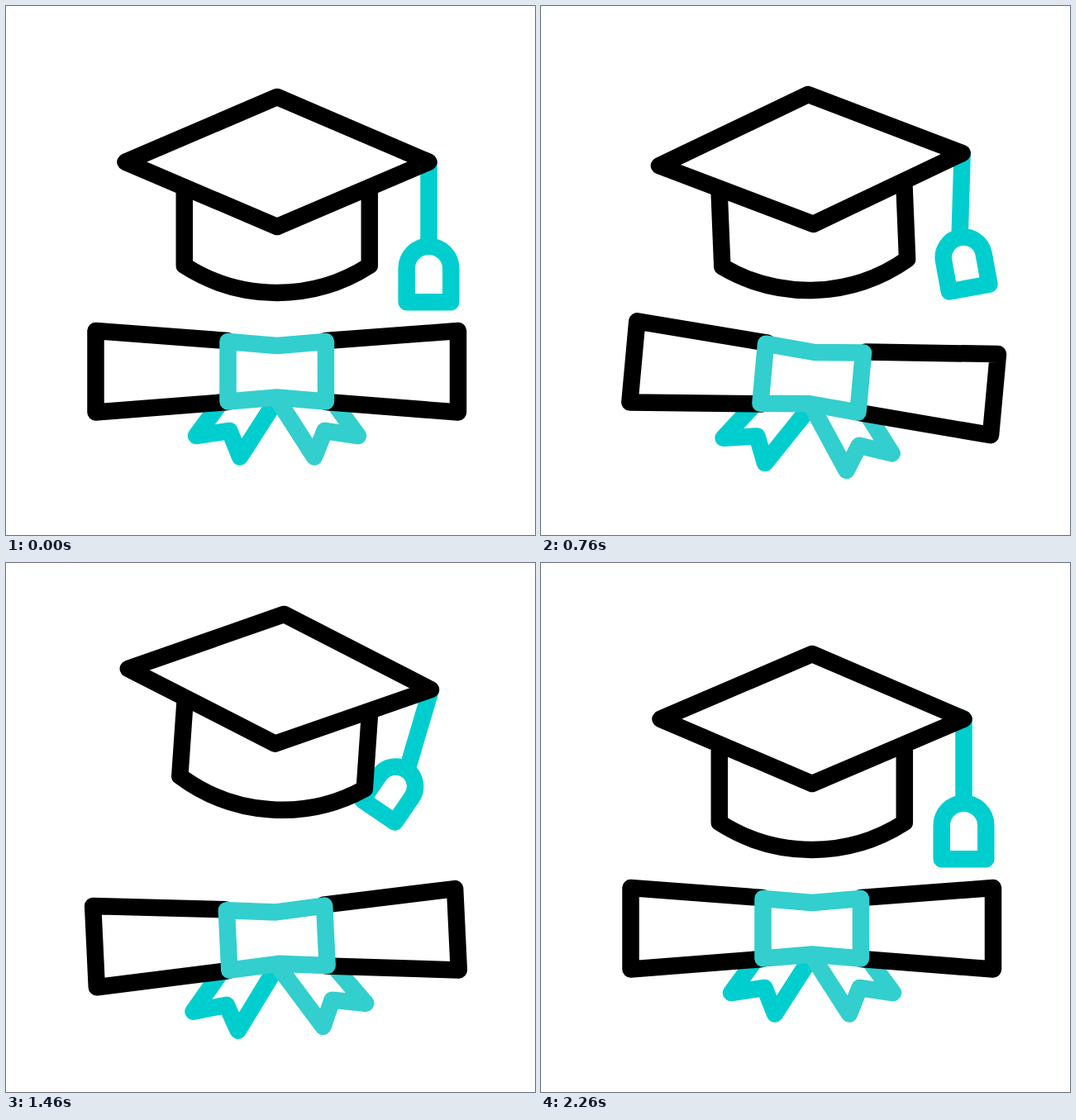
These frames come from a looping animation (640x640 px, 2.4 s). An HTML page:

```html
<!DOCTYPE html>
<html lang="en">
<head>
<meta charset="utf-8">
<title>Graduation cap and diploma</title>
<style>
html, body { margin: 0; height: 100%; overflow: hidden; background: #fff; }
svg { display: block; width: 100%; height: 100%; }
path { fill: #fff; stroke: #000; stroke-width: 20.5; stroke-linecap: round; stroke-linejoin: round; }
#bob { vector-effect: non-scaling-stroke; }
.teal { stroke: #00cece; }
.light { stroke: #33cece; }
</style>
</head>
<body>
<svg viewBox="0 0 640 640">
  <path id="tailL" class="teal"/>
  <path id="tailR" class="light"/>
  <path id="paper" d="M268 405L108.5 393V491.5L268 479M387 405L547 393V491.5L387 479"/>
  <path id="knot" class="light" d="M268.5 406L328 411L387 406V478.5L328 473.5L268.5 478.5Z"/>
  <g id="cap">
    <g id="tassel">
      <path class="teal" d="M511.5 189V287"/>
      <g transform="translate(511.5 289)">
        <path id="bob" class="teal" d="M-26.8 69.3V28.5A26.8 26.8 0 0 1 26.8 28.5V69.3Z"/>
      </g>
    </g>
    <path d="M215.8 200V314A207 207 0 0 0 439.8 314V200"/>
    <path d="M328 110L511.5 188.7L328 267L144.5 188.7Z"/>
  </g>
</svg>
<script>
const LOOP = 2400;
const el = id => document.getElementById(id);

// Smooth step from 0 to 1 between two times.
function ramp(t, start, end) {
  const p = Math.min(1, Math.max(0, (t - start) / (end - start)));
  return p * p * (3 - 2 * p);
}

// Rises to 1 at the peak and falls back to 0.
const pulse = (t, start, peak, end) => ramp(t, start, peak) - ramp(t, peak, end);

function pose(id, y, turn, cx, cy) {
  el(id).setAttribute('transform', `translate(0 ${y}) rotate(${turn} ${cx} ${cy})`);
}

// Ribbon tail: the base stays at the knot while the forked end slides outwards.
function tail(id, side, reach) {
  const x = d => 328 + side * d, dx = reach * 0.57, dy = reach * 0.56;
  el(id).setAttribute('d', `M${x(70)} 482L${x(98 + dx)} ${520 + dy}L${x(57.5 + dx)} ${514 + dy}` +
    `L${x(45 + dx)} ${545.5 + dy}L${x(1)} 477`);
}

// The tassel end blends straight between its poses, so it shrinks in mid-swing.
function swingBob(dip, lift, land) {
  const blend = fn => {
    const at = deg => fn(deg * Math.PI / 180);
    return at(0) * (1 - dip - lift - land) + at(-22) * dip + at(40) * lift + at(-16) * land;
  };
  const c = blend(Math.cos), s = blend(Math.sin);
  el('bob').setAttribute('transform', `matrix(${c} ${s} ${-s} ${c} 0 0)`);
}

function draw() {
  const t = performance.now() % LOOP;

  const dip = pulse(t, 200, 600, 1200);
  const lift = pulse(t, 600, 1200, 1800);
  const land = pulse(t, 1200, 1800, 2250);
  pose('cap', 15 * dip - 87 * lift + 9 * land, 10 * lift - 5 * (dip + land), 328, 230.5);
  pose('tassel', 0, 23 * lift - 3 * land, 511.5, 189);
  swingBob(dip, lift, land);

  const drop = 44.5 * pulse(t, 600, 1200, 1590);
  const tilt = 8 * pulse(t, 400, 1000, 1400) - 3 * pulse(t, 1000, 1400, 1800) + 1.5 * pulse(t, 1400, 1800, 2200);
  pose('paper', drop, tilt, 328, 469);
  pose('knot', drop, tilt, 328, 442);
  for (const [id, side] of [['tailL', -1], ['tailR', 1]]) {
    tail(id, side, drop);
    pose(id, drop, tilt, 328, 465);
  }
  requestAnimationFrame(draw);
}
draw();
</script>
</body>
</html>
```
